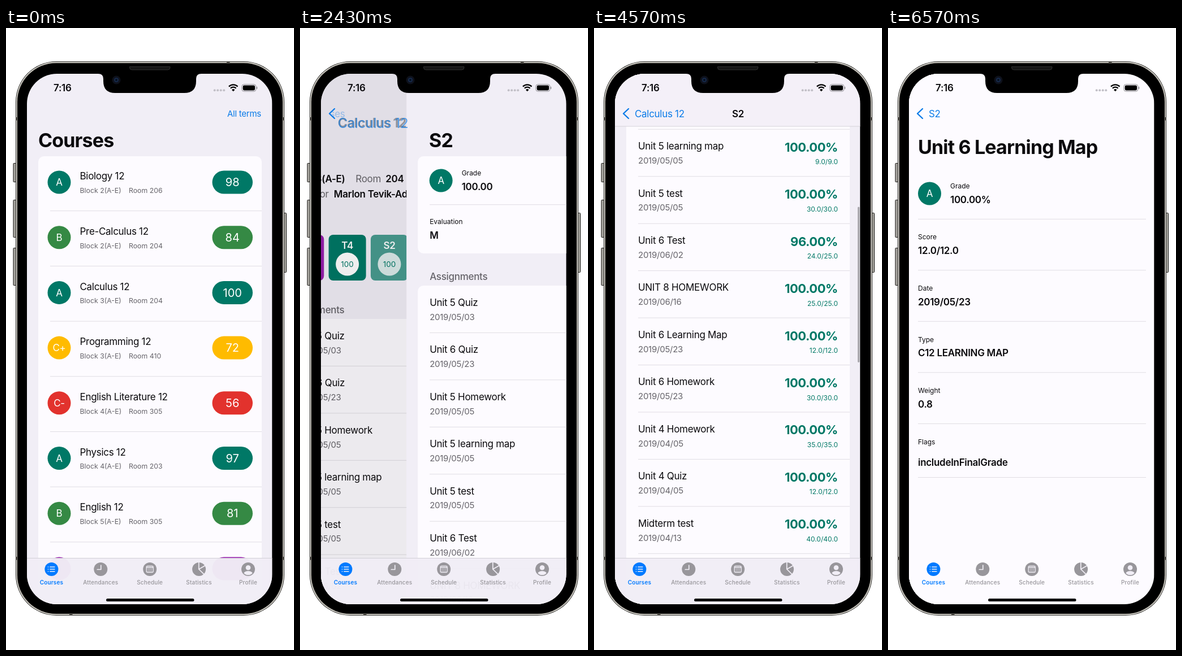
Write an HTML page that moves like this. It is 509 px wide and 1101 px high and loops after 8 s.

```html
<!DOCTYPE html>
<html lang="en">
<head>
<meta charset="utf-8">
<title>Course grades</title>
<style>
  html, body { margin: 0; width: 100%; height: 100%; overflow: hidden; background: #fff; }
  svg { display: block; width: 100vw; height: 100vh; }
  text { font-family: Inter, Roboto, sans-serif; font-optical-sizing: none; white-space: pre; }
  .hit rect { opacity: .7; }
  .hit circle { opacity: .8; }
</style>
</head>
<body>
<svg id="stage" viewBox="0 0 509 1101" xmlns="http://www.w3.org/2000/svg"></svg>
<script>
const W = 433.5, LEFT = 37;
const BG = '#f1eef6', CARD = '#fdfbff', BLUE = '#0a7be8', GRAY = '#66646a', LINE = '#e0dde3', PRESSED = '#cfced4';
const TEAL = '#007866', GREEN = '#358944', AMBER = '#ffbb00', RED = '#e2322d', PURPLE = '#981eae';
const TRACKING = { 34: -.85, 22: -.45, 17: -.3, 15: -.25, 10: .15 };

// Text placed by the middle of its capitals.
const text = (x, y, size, str, { fill = '#0b0a0d', weight = 400, anchor = 'start', id = '' } = {}) =>
  `<text ${id && `id="${id}"`} x="${x}" y="${y + size * .36}" font-size="${size}" font-weight="${weight}" fill="${fill}" text-anchor="${anchor}" letter-spacing="${TRACKING[size] || 0}">${str}</text>`;
const box = (x, y, w, h, r, fill, extra = '') =>
  `<rect x="${x}" y="${y}" width="${w}" height="${h}" rx="${r}" fill="${fill}" ${extra}/>`;
const disc = (x, y, r, fill) => `<circle cx="${x}" cy="${y}" r="${r}" fill="${fill}"/>`;
const rule = (x1, x2, y) => box(x1, y - .5, x2 - x1, 1, 0, LINE);
const stroke = (d, color, width, extra = '') =>
  `<path d="${d}" fill="none" stroke="${color}" stroke-width="${width}" stroke-linecap="round" stroke-linejoin="round" ${extra}/>`;
const middle = { anchor: 'middle' };
const badge = (x, y, letter, fill) => disc(x, y, 20.5, fill) + text(x, y, 17, letter, { fill: '#fff', ...middle });
const field = (x, y, label, value, gap = 24) =>
  text(x, y, 12, label) + text(x, y + gap, 17, value, { weight: 600 });

const page = (id, fill, body) =>
  `<g id="${id}">${box(LEFT, 80, W, 942, 0, fill)}${body}${box(LEFT, 80, W, 942, 0, '#000', `id="${id}Dim" opacity="0"`)}</g>`;

const courses = [
  ['A', 'Biology 12', '2(A-E)', 206, 98, TEAL],
  ['B', 'Pre-Calculus 12', '2(A-E)', 204, 84, GREEN],
  ['A', 'Calculus 12', '3(A-E)', 204, 100, TEAL],
  ['C+', 'Programming 12', '3(A-E)', 410, 72, AMBER],
  ['C-', 'English Literature 12', '4(A-E)', 305, 56, RED],
  ['A', 'Physics 12', '4(A-E)', 203, 97, TEAL],
  ['B', 'English 12', '5(A-E)', 305, 81, GREEN],
  ['', '', '', '', '', PURPLE]
];
const courseRow = ([letter, name, block, room, score, color], i) => {
  const y = 273 + 97.7 * i;
  return badge(94, y, letter, color) + text(130.5, y - 11, 17, name)
    + (name && text(130.5, y + 14.5, 12.3, `Block ${block}`, { fill: GRAY }) + text(217, y + 14.5, 12.3, `Room ${room}`, { fill: GRAY }))
    + box(364.5, y - 20.5, 71.5, 41, 20.5, color)
    + text(400.2, y, 20, score, { fill: '#fff', ...middle }) + rule(78, 452, y + 50.7);
};

const tasks = [
  ['Unit 5 Quiz', '2019/05/03', 10], ['Unit 6 Quiz', '2019/05/23', 10],
  ['Unit 5 Homework', '2019/05/05', 25], ['Unit 5 learning map', '2019/05/05', 9],
  ['Unit 5 test', '2019/05/05', 30], ['Unit 6 Test', '2019/06/02', 25, 24],
  ['UNIT 8 HOMEWORK', '2019/06/16', 25], ['Unit 6 Learning Map', '2019/05/23', 12],
  ['Unit 6 Homework', '2019/05/23', 30], ['Unit 4 Homework', '2019/04/05', 35],
  ['Unit 4 Quiz', '2019/04/05', 12], ['Midterm test', '2019/04/13', 40]
];
const STEP = 83.45;
const taskList = (top, x) => text(x, top - 16.5, 17, 'Assignments', { fill: GRAY, weight: 500 })
  + box(57, top, 395, 1500, 10, CARD)
  + box(57, top + 83.4 + STEP * 6, 395, STEP, 0, PRESSED, 'class="pressed" opacity="0"')
  + tasks.map(([name, date, max, got = max], i) => {
    const y = top + 29.7 + STEP * i, end = { fill: TEAL, anchor: 'end' };
    return text(78, y, 17, name) + text(78, y + 25.5, 15, date, { fill: GRAY })
      + text(431, y + 1.8, 22, `${(got / max * 100).toFixed(2)}%`, { ...end, weight: 700 })
      + text(431, y + 28, 12, `${got.toFixed(1)}/${max.toFixed(1)}`, end) + rule(78, 452, y + 53.7);
  }).join('');

const termCard = ([name, score, color], i) => {
  const x = 61 + 74.3 * i;
  return `<g id="term${name}">${box(x, 366, 66, 81, 8, color)}${text(x + 33, 385, 17, name, { fill: '#fff', weight: 600, ...middle })}${disc(x + 33, 418, 20.5, '#fff')}${text(x + 33, 418, 13.5, score, { fill: color, ...middle })}</g>`;
};

const coursePage = page('list', BG,
  box(57, 227, 395, 900, 10, CARD) + box(57, 421.6, 395, 97.7, 0, PRESSED, 'id="coursePressed" opacity="0"')
  + courses.map(courseRow).join(''));

const strong = { weight: 600 }, soft = { fill: GRAY };
const classPage = page('course', BG,
  text(61, 267, 17, 'Block', soft) + text(112.5, 267, 17, '3(A-E)', strong)
  + text(183, 267, 17, 'Room', soft) + text(236, 267, 17, '204', strong)
  + text(61, 294, 17, 'Instructor', soft) + text(144.5, 294, 17, 'Marlon Tevik-Adole', strong)
  + text(61, 343, 17, 'Grades', { ...soft, weight: 500 })
  + [['X2', '--', PURPLE], ['T4', 100, TEAL], ['S2', 100, TEAL], ['T3', 100, TEAL]].map(termCard).join('')
  + taskList(515, 61));

const termPage = page('term',  BG,
  `<g id="scroll">${text(57, 199, 34, 'S2', { weight: 700, id: 'termTitle' })}${box(57, 227, 395, 172, 10, CARD)}`
  + badge(98, 270, 'A', TEAL) + field(134.5, 257, 'Grade', '100.00') + rule(78, 452, 312.7)
  + field(78, 342.7, 'Evaluation', 'M') + taskList(456, 78) + '</g>'
  + `<g id="bar">${box(LEFT, 80, W, 94, 0, '#f4f0f8')}${box(LEFT, 173.6, W, .9, 0, '#d2cfd6')}</g>`
  + box(466, 0, 3.4, 100, 1.7, '#a9a7ad', 'id="thumb"'));

const taskPage = page('task', CARD,
  text(53, 211, 34, 'Unit 6 Learning Map', { weight: 700, id: 'taskTitle' })
  + badge(73.5, 293, 'A', TEAL) + field(110, 280, 'Grade', '100.00%')
  + [['Score', '12.0/12.0'], ['Date', '2019/05/23'], ['Type', 'C12 LEARNING MAP'], ['Weight', '0.8']]
    .map(([k, v], i) => field(53, 370 + 90.6 * i, k, v)).join('')
  + field(53, 732.5, 'Flags', 'includeInFinalGrade', 36.5)
  + [338.3, 428.8, 519.3, 609.8, 700.4, 795.5].map(y => rule(53, 456, y)).join(''));

// A large title and the back label it turns into, both drawn at their own origin.
const morph = (id, str, weight) => `<g id="${id}Big">${text(0, 0, weight === 700 ? 34 : 17, str, { weight })}</g>`
  + `<g clip-path="url(#backClip)"><g id="${id}Back">${text(0, 0, 17, str, { fill: BLUE })}</g></g>`;
const nav = stroke('M61 143L52 151.5L61 160', BLUE, 2.4, 'id="chevron"')
  + text(451, 151.5, 15, 'All terms', { fill: BLUE, anchor: 'end', id: 'allTerms' })
  + morph('courses', 'Courses', 700) + morph('calc', 'Calculus 12', 700) + morph('s2', 'S2', 600);

const icons = [
  ['Courses', stroke('M-2.5-4h8M-2.5 0h8M-2.5 4h8M-6-4h.2M-6 0h.2M-6 4h.2', BG, 1.6)],
  ['Attendances', stroke('M.5-7V.5H-6', BG, 1.7)],
  ['Schedule', box(-6, -5.5, 12, 11, 2, 'none', `stroke="${BG}" stroke-width="1.3"`)
    + stroke('M-5.5-3h11', BG, 1.3) + stroke('M-3 0h6.5M-3 3h6.5', BG, 1.6, 'stroke-dasharray=".1 2.7"')],
  ['Statistics', stroke('M-.3-12V0L8.8 8.8M-.3 0L11-6.5', BG, 1.7)],
  ['Profile', disc(0, -2.8, 4.3, BG) + `<path d="M-7.6 7C-6 2 6 2 7.6 7A10.3 10.3 0 0 1-7.6 7Z" fill="${BG}"/>`]
];
const tabs = `<g id="tabBack">${box(LEFT, 938, W, 84, 0, BG, 'opacity=".97"')}${box(LEFT, 938, W, .9, 0, '#cfccd3')}</g>`
  + icons.map(([name, art], i) => {
    const x = 80.4 + 86.9 * i, fill = i ? '#98969b' : '#007aff';
    return `<g transform="translate(${x} 958)">${disc(0, 0, 12, fill)}${art}</g>`
      + text(x, 981, 10, name, { fill, weight: i ? 500 : 600, ...middle });
  }).join('') + box(177, 1010, 155.5, 5, 2.5, '#000');

const status = text(84, 106, 17, '7:16', { weight: 600 })
  + [368.7, 374.2, 379.7, 385.2].map(x => disc(x, 110.2, 2, '#c2c0c7')).join('')
  + stroke('M393.9 103.6a11 11 0 0 1 15.6 0M396.8 106.7a7 7 0 0 1 9.8 0', '#000', 2.2, 'style="stroke-linecap:butt"')
  + '<path d="M401.7 112.2l-2.7-2.8a3.8 3.8 0 0 1 5.4 0z"/>'
  + box(416.8, 99.8, 25, 12.4, 3.8, 'none', 'stroke="#8f8d93" stroke-width="1"')
  + box(418.6, 101.6, 21.4, 8.8, 2.3, '#000') + box(442.8, 103.8, 1.4, 4.4, .7, '#8f8d93');

const button = (x, y, h) => box(x, y, 5, h, 1, '#a5a39d', 'stroke="#1c1b19" stroke-width="1"');
const ring = (inset, fill) => box(17 + inset, 59 + inset, 475 - 2 * inset, 981 - 2 * inset, 72 - inset, fill);
const phone = button(13, 239.5, 33) + button(13, 304.5, 66) + button(13, 389.5, 66) + button(490.5, 327.5, 105)
  + ring(0, '#2b2a27') + ring(1, '#e9e7e0') + ring(2.4, '#5b5852') + ring(3.4, '#000')
  + [[17, 158], [488, 158], [17, 936], [488, 936]].map(([x, y]) => box(x, y, 4, 5.5, 0, '#4a4843')).join('')
  + [[390, 59], [112, 1036]].map(([x, y]) => box(x, y, 5.5, 4, 0, '#4a4843')).join('');
const notch = '<path d="M163 79V81Q172 81 172 90V94Q172 115 193 115H315Q336 115 336 94V90Q336 81 345 81V79Z"/>'
  + '<path d="M218.500 68.500H290V70Q290 74 286 74H222.500Q218.500 74 218.500 70Z" fill="#151515" stroke="#3a3a3a" stroke-width=".8"/>'
  + disc(195, 92, 7.5, '#0e111b') + disc(195, 92, 4, '#16294a') + disc(195, 92, 2, '#07101f');

document.getElementById('stage').innerHTML =
  `<defs><clipPath id="screen">${box(LEFT, 81, W, 939, 53, '#000')}</clipPath>
   <clipPath id="backClip">${box(56.5, 80, 420, 140, 0, '#000')}</clipPath></defs>
   ${phone}<g clip-path="url(#screen)">${coursePage + classPage + termPage + taskPage + nav + tabs + status}</g>${notch}`;

const $ = id => document.getElementById(id);
const set = (id, name, value) => $(id).setAttribute(name, value);
const place = (id, x, y, scale = 1, opacity = 1) => {
  set(id, 'transform', `translate(${x} ${y}) scale(${scale})`);
  set(id, 'opacity', opacity);
};

// Share of the push still to go: a critically damped spring.
const remaining = (t, start) => {
  const k = Math.max(0, t - start) * .018, r = (1 + k) * Math.exp(-k);
  return r < .002 ? 0 : r;
};
const scrollAt = t => {
  const u = Math.min(1, Math.max(0, (t - 3789) / 925));
  return t < 3850 ? 0 : 532 * (1 - (1 - u) ** 2.5);
};
const slide = (id, enter, leave) => {
  set(id, 'transform', `translate(${enter * W - 130 * (1 - leave)} 0)`);
  set(id + 'Dim', 'opacity', .1 * (1 - leave));
};
const moveTitle = (id, enter, leave, gone) => {
  const p = 1 - leave, x = 57 + enter * (W + 57) + 15 * p, y = 199 - 47.5 * p;
  place(id + 'Big', x, y, 1 - .5 * p, leave);
  place(id + 'Back', x - 88 * (1 - gone), y, 2.2 - 1.2 * p, p * gone);
};

function draw(time) {
  const n = Math.floor((time + 5) * .007), t = n / .007;   // 7 pictures a second
  const a = remaining(t, 706), b = remaining(t, 2305), c = remaining(t, 5930), y = scrollAt(t);

  slide('list', 0, a);
  slide('course', a, b);
  slide('term', b, c);
  slide('task', c, 1);
  set('coursePressed', 'opacity', n >= 4 ? 1 : 0);
  $('termS2').classList.toggle('hit', n >= 15);
  document.querySelector('#scroll .pressed').setAttribute('opacity', n >= 41 ? 1 : 0);

  set('scroll', 'transform', `translate(0 ${-y})`);
  set('termTitle', 'x', 57 + 57 * b);
  set('taskTitle', 'x', 53 + 57 * c);
  set('bar', 'opacity', y > 40 ? 1 : 0);
  set('thumb', 'opacity', y > 0 && n < 41 ? 1 : 0);
  set('thumb', 'y', 275 + (y - 373) * .27);
  set('thumb', 'height', 289 - (y - 373) * .088);

  moveTitle('courses', 0, a, b);
  moveTitle('calc', a, b, c);
  place('s2Big', 244 - 172 * (1 - c), 151.5, 1, y > 50 ? c : 0);
  place('s2Back', 244 - 172 * (1 - c), 151.5, 1, 1 - c);
  set('allTerms', 'opacity', a);
  set('chevron', 'opacity', Math.max(0, 1 - a * 5));
  set('tabBack', 'opacity', c);
}

const start = performance.now();
function tick() {
  draw((performance.now() - start) % 8000);
  requestAnimationFrame(tick);
}
tick();
</script>
</body>
</html>
```
